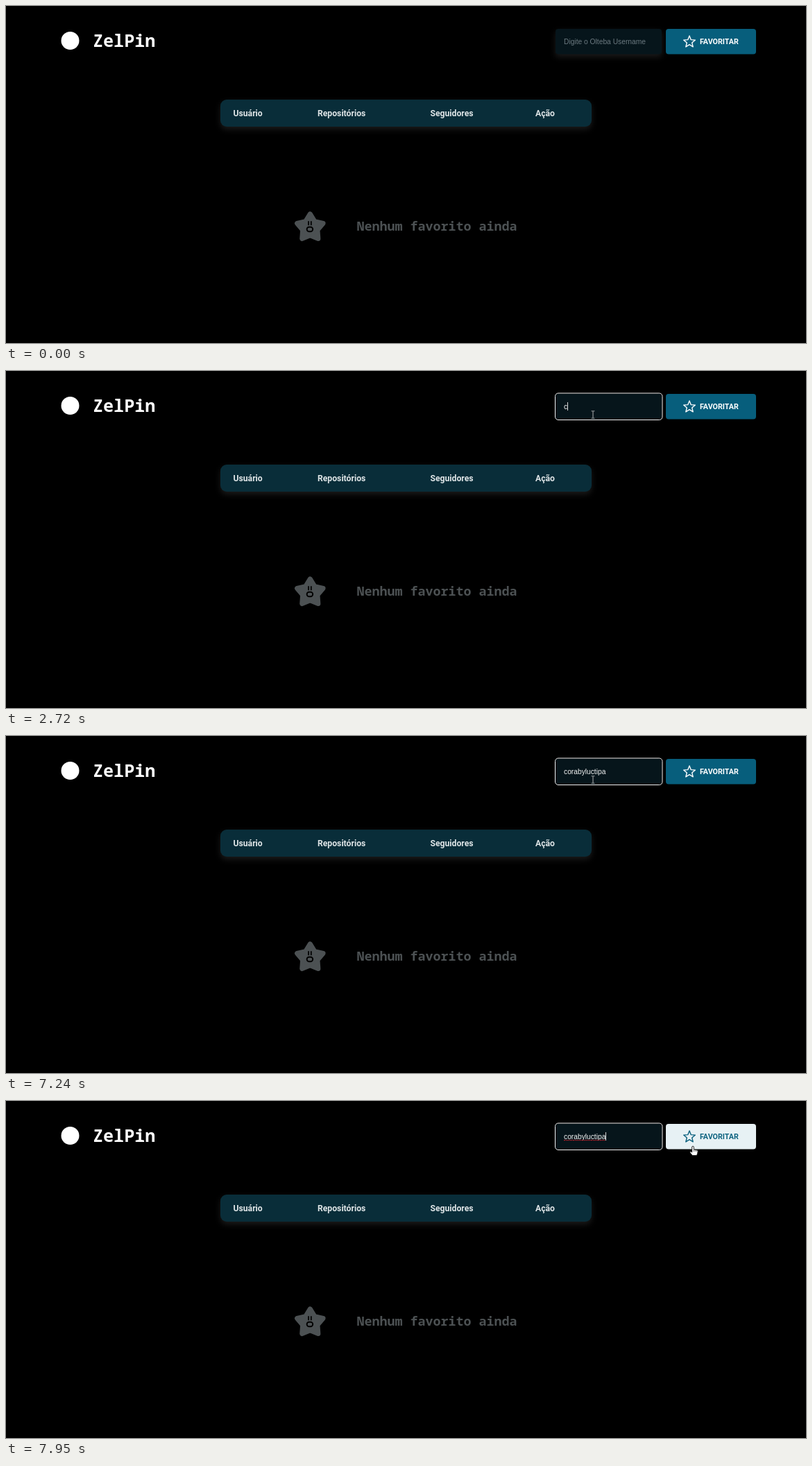
Recreate the animation shown at these times as an HTML page. Size 1153x486 px, loop 8 s.

```html
<!DOCTYPE html>
<html lang="pt">
<head>
<meta charset="utf-8">
<title>Favoritos</title>
<style>
  html, body { margin: 0; width: 100%; height: 100%; overflow: hidden; background: #000; }
  svg { display: block; width: 100%; height: 100%; }
  .mono { font-family: "Roboto Mono", "Noto Sans Mono", "DejaVu Sans Mono", monospace; font-weight: 700; }
  .head { font: 700 12.2px Roboto, sans-serif; fill: #dfe5e7; }
  .label { font: 700 10.7px Roboto, sans-serif; }
  .field { font: 10.25px "Liberation Sans", Arial, sans-serif; }
  .glow { filter: drop-shadow(0 4px 4px rgba(255, 255, 255, .1)); }
</style>
</head>
<body>
<svg viewBox="0 0 1153 486">
  <rect width="1153" height="486"/>

  <circle cx="92.5" cy="50" r="13" fill="#fff"/>
  <text class="mono" x="125" y="59" font-size="25.1" fill="#fff">ZelPin</text>

  <rect id="input" x="792" y="33" width="153" height="36.5" rx="4" fill="#06151b"/>
  <rect id="ring" x="791.5" y="32" width="154.5" height="38.5" rx="4.5" fill="none" stroke="#f2f2f2"/>
  <text id="hint" class="field" x="804" y="54.5" fill="#6c7a80">Digite o Olteba Username</text>
  <text id="typed" class="field" x="804" y="54.5" fill="#f4f4f4"></text>
  <path id="spell" d="M804 56.6H865" stroke="#c8252f" stroke-dasharray="2 .6"/>
  <rect id="caret" width="1" height="12" fill="#d8d8d8"/>

  <rect id="button" x="951" y="33" width="130" height="36.5" rx="4"/>
  <polygon id="icon" fill="none" stroke-width="1.4" stroke-linejoin="round"/>
  <text id="label" class="label" x="1000" y="55">FAVORITAR</text>

  <rect class="glow" x="309" y="135" width="535" height="39" rx="9" fill="#092d39"/>
  <g class="head">
    <text x="327.5" y="158.5">Usuário</text>
    <text x="449" y="158.5">Repositórios</text>
    <text x="611.5" y="158.5">Seguidores</text>
    <text x="763" y="158.5">Ação</text>
  </g>

  <polygon id="star" fill="#4c5153" stroke="#4c5153" stroke-width="7" stroke-linejoin="round"/>
  <path d="M436 310.2V316.2M439.8 310.2V316.2" stroke="#000" stroke-width="1.8"/>
  <rect x="433.6" y="318.8" width="8.6" height="6.4" rx="3.2" fill="none" stroke="#000" stroke-width="1.9"/>
  <text class="mono" x="505.5" y="324" font-size="18.35" fill="#4c5153">Nenhum favorito ainda</text>
  <rect id="bar" x="659.5" y="305" width="1" height="24" fill="#666"/>

  <circle id="click" cx="845" cy="62.5" r="9.2" fill="#7f8010"/>
  <g id="arrow">
    <path d="M0 0V14.5L3.4 11.4L5.6 16.5L7.9 15.5L5.8 10.6H10.4Z" fill="#fff" stroke="#000" stroke-width=".8"/>
  </g>
  <g id="beam">
    <path d="M-2.3 -5.2H-.6L0 -4.7L.6 -5.2H2.3M0 -4.7V4.7M-2.3 5.2H-.6L0 4.7L.6 5.2H2.3" fill="none" stroke="#c4c4c4" stroke-width=".9"/>
  </g>
  <g id="hand">
    <path d="M-1.3 .9Q0 -.8 1.3 .9V4.8L6.2 5.8Q7.3 6.2 7.2 7.6L6.6 11L5.5 13.6H-.8L-4.2 9.2Q-4.6 7.6 -3 7.7L-1.3 9Z" fill="#fff" stroke="#111" stroke-width=".9" stroke-linejoin="round"/>
    <path d="M1.3 5V8M3.4 5.4V8M5.4 5.8V8.2" stroke="#111" stroke-width=".6"/>
  </g>
</svg>
<script>
const LOOP = 8000;
const USER = 'corabyluctipa';
const KEYS = [2720, 2850, 3180, 3250, 3450, 4460, 4860, 5060, 5190, 5520, 5650, 6450, 6650];
const CARET_OFF = [[1860, 2390], [4000, 4460], [6180, 6450], [7240, 7808]];
const FOCUS = 1460, HOVER = 7666, FADE = 355;
const BLUE = [7, 94, 124], PALE = [238, 245, 248], WHITE = [255, 255, 255];

const el = {};
document.querySelectorAll('[id]').forEach(node => el[node.id] = node);

const within = (t, a, b) => t >= a && t < b;
const clamp = v => Math.min(1, Math.max(0, v));
const mix = (a, b, p) => a + (b - a) * p;
const blend = (a, b, p) => `rgb(${a.map((v, i) => Math.round(mix(v, b[i], p)))})`;
const show = (node, on) => node.setAttribute('visibility', on ? 'visible' : 'hidden');
// The pointer and hover fade advance in coarse steps.
const step = (t, start, size) => start + Math.floor((t - start) / size) * size;

function starPoints(cx, cy, outer, inner) {
  return Array.from({ length: 10 }, (_, i) => {
    const r = i % 2 ? inner : outer, a = i * Math.PI / 5;
    return `${(cx + r * Math.sin(a)).toFixed(2)},${(cy - r * Math.cos(a)).toFixed(2)}`;
  }).join(' ');
}

function pointer(t) {
  if (t < 440) return null;
  if (t < 7240) {
    const p = clamp((step(t, 440, 68.75) - 440) / 550);
    const e = 1 - (1 - p) ** 2;
    return [mix(1103, 846, e), mix(477, 63, e)];
  }
  const p = clamp((step(t, 7240, 71) - 7240) / 568);
  const e = p * p * (3 - 2 * p);
  return [mix(846, 990, e), mix(63, 65, e)];
}

function drawPointer(t) {
  const pos = pointer(t);
  const kind = !pos ? '' : pos[0] > 951 && pos[1] < 70 ? 'hand'
    : pos[0] < 945 && pos[1] < 70 ? 'beam' : 'arrow';
  for (const name of ['arrow', 'beam', 'hand']) {
    show(el[name], name === kind);
    if (name === kind) el[name].setAttribute('transform', `translate(${pos})`);
  }
}

function drawField(t) {
  const count = KEYS.filter(k => t >= k).length;
  const focused = t >= FOCUS;
  el.typed.textContent = USER.slice(0, count);
  show(el.hint, !count);
  show(el.ring, focused);
  el.input.setAttribute('class', focused ? '' : 'glow');
  show(el.spell, t >= 7950);
  show(el.caret, focused && !CARET_OFF.some(([a, b]) => within(t, a, b)));
  el.caret.setAttribute('x', 804 + (count ? Math.round(el.typed.getComputedTextLength()) : 0));
  el.caret.setAttribute('y', count ? 45 : 46);
}

function drawButton(t) {
  const x = clamp((step(t, HOVER, 71) - HOVER) / FADE);
  const p = 1 - (1 - x) ** 2.2;
  el.button.setAttribute('fill', blend(BLUE, PALE, p));
  el.label.setAttribute('fill', blend(WHITE, BLUE, p));
  el.icon.setAttribute('stroke', blend(WHITE, BLUE, t >= HOVER ? 1 : 0));
}

function draw(t) {
  drawField(t);
  drawButton(t);
  drawPointer(t);
  show(el.click, within(t, 1330, 1530));
  show(el.bar, within(t, 1400, 1460));
}

el.icon.setAttribute('points', starPoints(985, 51.8, 8.8, 3.9));
el.star.setAttribute('points', starPoints(438.3, 319.6, 19.7, 11.2));

const begin = performance.now();
function tick() {
  draw((performance.now() - begin) % LOOP);
  requestAnimationFrame(tick);
}
tick();
</script>
</body>
</html>
```
